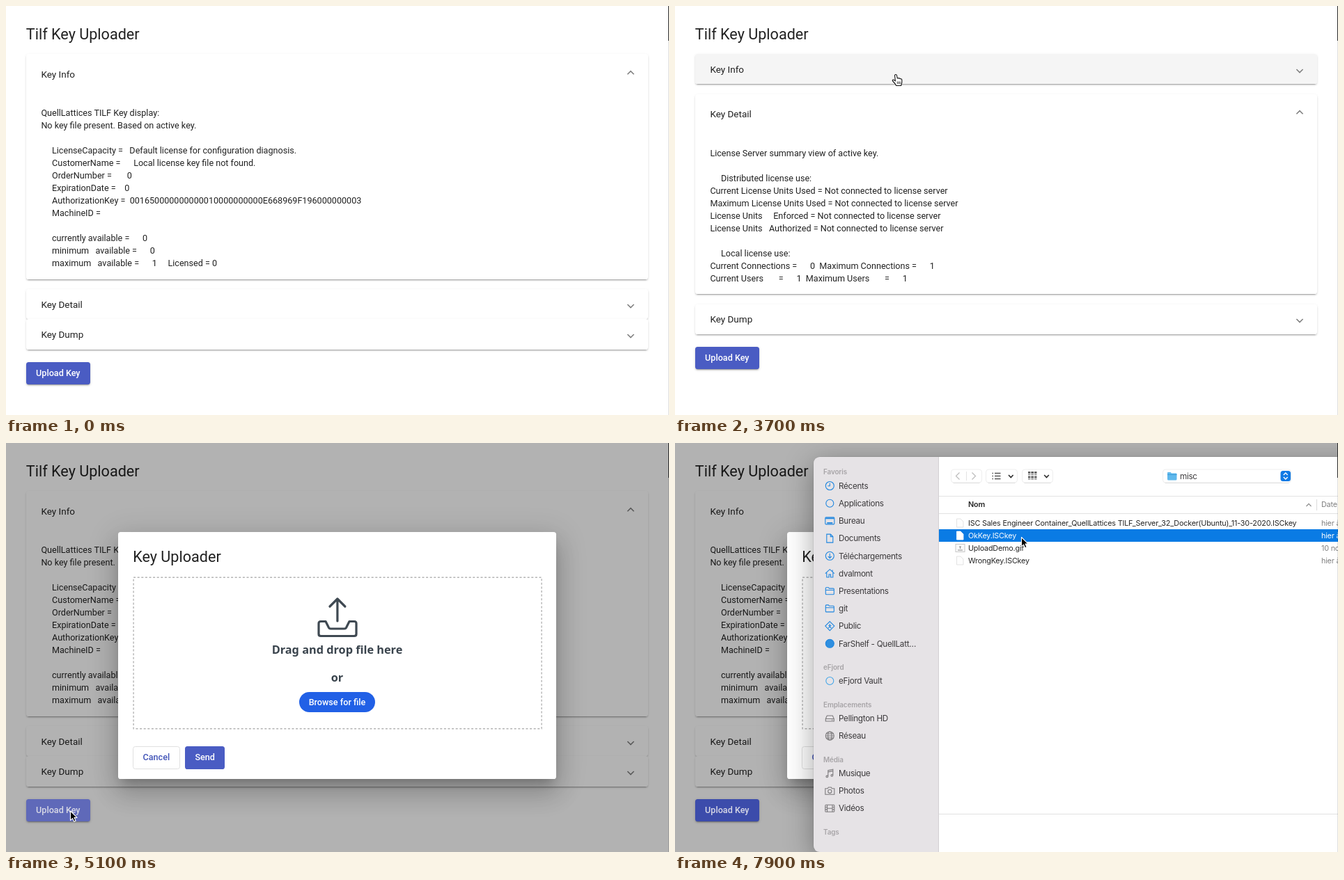
Animation, 952 px wide and 588 px high, one loop 8 s. Source, as an HTML page:

```html
<!DOCTYPE html>
<html lang="en">
<head>
<meta charset="utf-8">
<title>Tilf Key Uploader</title>
<style>
html, body { margin: 0; width: 100%; height: 100%; overflow: hidden; background: #fff; }
#stage { position: relative; width: 952px; height: 588px; overflow: hidden; background: #fff;
  font: 12.6px/18px Roboto, sans-serif; color: rgba(0,0,0,.87); }
#stage * { box-sizing: border-box; }
.abs { position: absolute; }
h1, h2 { position: absolute; margin: 0; font-size: 21.6px; line-height: 32px; font-weight: 400; white-space: nowrap; }
h1 { left: 28.8px; top: 25px; }
#list { left: 28.8px; top: 69px; width: 893.6px; }
.panel { position: relative; background: #fff; border-radius: 3.6px; margin: calc(14.4px * var(--e)) 0;
  box-shadow: 0 2.7px 1px -1.8px rgba(0,0,0,.2), 0 1.8px 1.8px rgba(0,0,0,.14), 0 1px 4.5px rgba(0,0,0,.07); }
.panel:first-child { margin-top: 0; }
.panel:last-child { margin-bottom: 0; }
.head { position: relative; height: calc(43.2px + 14.4px * var(--e)); padding-left: 21.6px;
  display: flex; align-items: center; font-size: 13.5px; border-radius: 3.6px; }
.head svg { position: absolute; left: 862.2px; top: calc(50% - 6px); overflow: visible;
  transform: translateY(calc(2.4px - 4.6px * var(--e))) rotate(calc(180deg * var(--e))); }
.body { overflow: hidden; height: calc(var(--h) * var(--e)); }
pre { margin: 0; padding: 18.4px 0 0 21.6px; font: inherit; }
.btn { position: absolute; height: 32.4px; line-height: 32.4px; text-align: center; font-weight: 500; color: #fff;
  background: #4a5cc3; border-radius: 3.6px;
  box-shadow: 0 2.7px 1px -1.8px rgba(0,0,0,.2), 0 1.8px 1.8px rgba(0,0,0,.14), 0 1px 4.5px rgba(0,0,0,.12); }
#upload { left: 28.8px; width: 92px; z-index: 2; }
#shade { inset: 0; background: #000; z-index: 1; }
#dialog { left: 160.6px; top: 128px; width: 629.8px; height: 355.4px; z-index: 3; background: #fff; border-radius: 3.6px;
  box-shadow: 0 10px 13.5px -6px rgba(0,0,0,.2), 0 21.6px 34px 2.7px rgba(0,0,0,.14), 0 8px 41px 7px rgba(0,0,0,.12); }
#dialog h2 { left: 21.6px; top: 20px; }
.drop { left: 0; width: 100%; text-align: center; font: 700 16.3px/24px "Noto Sans", sans-serif; color: #3a444d; }
#browse { left: 260.2px; top: 230.2px; width: 109.4px; height: 29px; border-radius: 15px; line-height: 29px;
  background: #2160e6; color: #fff; text-align: center; font-weight: 500; }
#finder { left: 199px; top: 20px; width: 1000px; height: 568px; z-index: 4; background: #fff;
  border-radius: 10px 0 0 10px; box-shadow: 0 0 1px rgba(0,0,0,.6), 0 10px 42px rgba(0,0,0,.36); }
#finder svg { position: absolute; left: -199px; top: -20px; }
#finder text { font-family: Inter, sans-serif; }
.side { font-size: 11.7px; letter-spacing: -.025em; fill: #3b393b; }
.group { font-size: 9.9px; font-weight: 600; letter-spacing: -.01em; fill: #a7a4a7; }
.file { font-size: 10.8px; letter-spacing: -.018em; fill: #262626; }
.dim { fill: #808080; }
.picked text { fill: #fff; }
.picked path { fill: #fff; stroke: #fff; }
.cur { left: 0; top: 0; z-index: 6; overflow: visible; }
.edge { left: 951px; width: 1px; z-index: 5; }
</style>
</head>
<body>
<div id="stage">
  <h1>Tilf Key Uploader</h1>
  <div id="list" class="abs"></div>
  <div id="upload" class="btn">Upload Key</div>
  <div id="shade" class="abs"></div>
  <div id="dialog" class="abs">
    <h2>Key Uploader</h2>
    <svg class="abs" style="left:0;top:0" width="630" height="356" fill="none">
      <rect x="22.1" y="65.2" width="586" height="217.6" stroke="#b4b4b4" stroke-width="1.4" stroke-dasharray="3 2.6"/>
      <g stroke="#3f4952" stroke-width="3.2" stroke-linecap="round" stroke-linejoin="round">
        <path d="M314.9 128V96.500M304 107L314.900 96L325.800 107"/>
        <path d="M291 128.500H298L302.500 137.500Q303.300 139 305 139H325Q326.700 139 327.500 137.500L332 128.500H339Q342 128.500 342 131.500V146.500Q342 149.500 339 149.500H291Q288 149.500 288 146.500V131.500Q288 128.500 291 128.500Z"/>
      </g>
    </svg>
    <div class="abs drop" style="top:157px">Drag and drop file here</div>
    <div class="abs drop" style="top:197px">or</div>
    <div id="browse" class="abs">Browse for file</div>
    <div class="btn" style="left:21.6px;top:308.400px;width:67.400px;background:#fff;color:#4254b8;border:1px solid #e0e0e0;line-height:30.400px;box-shadow:none">Cancel</div>
    <div class="btn" style="left:96.400px;top:308.400px;width:57.400px;box-shadow:none">Send</div>
  </div>
  <div id="finder" class="abs"></div>
  <div class="abs edge" style="top:0;height:50px;background:#2c2c2c"></div>
  <div class="abs edge" style="top:50px;height:538px;background:rgba(0,0,0,.12)"></div>
  <svg id="arrow" class="abs cur" width="1" height="1">
    <path d="M0 0V13.400L3.100 10.600L5.200 15.300L7.600 14.200L5.500 9.600H9.600Z" fill="#000" stroke="#fff" stroke-width="1.1" stroke-linejoin="round"/>
  </svg>
  <svg id="hand" class="abs cur" width="1" height="1">
    <path d="M-1.500 .8Q-1.300 -.6 0 -.5Q1.300 -.4 1.500 1L2.300 5Q3.800 3.800 4.700 5.300Q6 4.300 7 5.900Q8.500 5.300 8.800 7.200V10.500L7.600 15.500H.8Q-.8 12.500 -4.300 9Q-5.300 7.600 -4 7Q-2.800 6.600 -.6 8.800Z" fill="#fff" stroke="#111" stroke-width="1.1" stroke-linejoin="round"/>
    <path d="M2.300 9.500V13M4.300 9.500V13M6.200 9.500V13" stroke="#111" stroke-width=".8"/>
  </svg>
</div>
<script>
const $ = id => document.getElementById(id);

const infoText = `QuellLattices TILF Key display:
No key file present. Based on active key.

     LicenseCapacity =   Default license for configuration diagnosis.
     CustomerName =      Local license key file not found.
     OrderNumber =       0
     ExpirationDate =    0
     AuthorizationKey =  001650000000000010000000000E668969F196000000003
     MachineID =

     currently available =      0
     minimum   available =      0
     maximum   available =      1     Licensed = 0`;
const detailText = `License Server summary view of active key.

     Distributed license use:
Current License Units Used = Not connected to license server
Maximum License Units Used = Not connected to license server
License Units     Enforced = Not connected to license server
License Units   Authorized = Not connected to license server

     Local license use:
Current Connections =      0  Maximum Connections =      1
Current Users       =      1  Maximum Users       =      1`;

const panel = (name, text, height) => `<div class="panel" style="--e:0;--h:${height}px">
  <div class="head">${name}<svg width="12" height="12"><path d="M1.400 3.600L6 8.200L10.600 3.600" fill="none" stroke="#808080" stroke-width="1.6"/></svg></div>
  <div class="body"><pre>${text}</pre></div></div>`;
$('list').innerHTML = panel('Key Info', infoText, 266.2) + panel('Key Detail', detailText, 230.2) + panel('Key Dump', '', 0);
const panels = [...document.querySelectorAll('.panel')];
const heads = panels.map(p => p.firstElementChild);

// File chooser
const ring = '<circle r="6"/>';
const folder = '<path d="M-6 4V-4Q-6 -5 -5 -5H-2L-.8 -3.600H5Q6 -3.600 6 -2.600V4Q6 5 5 5H-5Q-6 5 -6 4ZM-6 -1.200H6"/>';
const icons = {
  clock: ring + '<path d="M0 -3.800V.3H-3"/>',
  dot: '<circle r="5.500"/>',
  disc: '<circle r="6" fill="#2f8fe0"/>',
  desk: '<rect x="-6.500" y="-5" width="13" height="10" rx="1.200"/><path d="M-6 -3.600H6M-4 3H4" stroke-width="1.8"/>',
  page: '<path d="M-4.500 -6H1L4.500 -2.500V6H-4.500ZM1 -6V-2.500H4.500"/>',
  down: ring + '<path d="M0 -3.500V3M-2.600 .6L0 3.200L2.600 .6"/>',
  home: '<path d="M-6.500 .2L0 -5.800L6.500 .2M-4.500 -1V5.500H-1.200V1.500H1.200V5.500H4.500V-1M3.800 -2.500V-5"/>',
  folder,
  walk: '<path d="M0 -6.500L6.500 0L0 6.500L-6.500 0ZM0 -3V.5L-2 3M0 .5L2 3M-2 -.6H2.200"/>',
  drive: '<path d="M-6 .5L-4 -4H4L6 .5V4H-6ZM-6 .5H6M2.500 2.300H4.200"/>',
  globe: ring + '<ellipse rx="2.700" ry="6"/><path d="M-6 0H6M-5 -3H5M-5 3H5"/>',
  note: '<path d="M-2.500 4V-4.500L4.500 -6V2.500M-2.500 -2.300L4.500 -3.800"/><circle cx="-4" cy="4.200" r="1.300"/><circle cx="3" cy="2.700" r="1.300"/>',
  photo: '<path d="M-6.500 -3.500H-3L-2 -5.200H2L3 -3.500H6.500V5H-6.500Z"/><circle cy=".6" r="2.600"/>',
  film: '<rect x="-6.500" y="-5" width="13" height="10" rx="1"/><path d="M-3.700 -5V5M3.700 -5V5M-3.700 0H3.700M-6.500 -1.700H-3.700M-6.500 1.700H-3.700M3.700 -1.700H6.500M3.700 1.700H6.500"/>'
};
const words = (x, y, text, cls, extra = '') => `<text x="${x}" y="${y}" class="${cls}" ${extra}>${text}</text>`;
const group = (y, name) => words(213, y + 3.6, name, 'group');
const item = (y, name, icon, color = '#1f86df') =>
  `<g transform="translate(222.300 ${y})" fill="none" stroke="${color}" stroke-width="1.100">${icons[icon]}</g>` +
  words(235, y + 4.2, name, 'side');
const gray = '#7d7b7d';
const line = (d, color = '#555', w = 1.3) => `<path d="${d}" fill="none" stroke="${color}" stroke-width="${w}"/>`;
const pill = (x, w) => `<rect x="${x}" y="38" width="${w}" height="19" rx="4" fill="#fff" stroke="#eee"/>` +
  line(`M${x + 3} 57.500H${x + w - 3}`, '#dedede', 1);

const favs = [['Récents', 'clock'], ['Applications', 'dot'], ['Bureau', 'desk'], ['Documents', 'page'],
  ['Téléchargements', 'down'], ['dvalmont', 'home'], ['Presentations', 'folder'], ['git', 'folder'],
  ['Public', 'walk'], ['FarShelf - QuellLatt…', 'disc']];
const files = [
  ['ISC Sales Engineer Container_QuellLattices TILF_Server_32_Docker(Ubuntu)_11-30-2020.ISCkey', 'hier à 12:04'],
  ['OkKey.ISCkey', 'hier à 12:04'], ['UploadDemo.gif', '10 nov. 2020'], ['WrongKey.ISCkey', 'hier à 12:04']];

const sidebar = group(41, 'Favoris') + favs.map((f, i) => item(61.5 + 25.2 * i, ...f)).join('') +
  group(322, 'eFjord') + item(342, 'eFjord Vault', 'dot', '#42a5e8') +
  group(376, 'Emplacements') + item(396, 'Pellington HD', 'drive', gray) +
  `<g id="net">${item(421, 'Réseau', 'globe', gray)}</g>` +
  `<g id="low">${group(430, 'Média') + item(450, 'Musique', 'note', gray) + item(475, 'Photos', 'photo', gray) +
    item(500, 'Vidéos', 'film', gray) + group(534, 'Tags')}</g>`;

const toolbar = pill(396.5, 44) + line('M418.500 41V54', '#e4e4e4', 1) +
  line('M408.500 42.500L403.500 47.500L408.500 52.500M426.500 42.500L431.500 47.500L426.500 52.500', '#bdbdbd') +
  pill(446.5, 45) + line('M459 43.500H467.500M459 47.500H467.500M459 51.500H467.500') +
  line('M455.500 43.500H457M455.500 47.500H457M455.500 51.500H457', '#555', 1.6) +
  pill(498.5, 44) + line('M507 42.500H519.500M507 49H519.500', '#666', 3.2) + line('M507 45.500H519.500M507 52H519.500', '#666', 1) +
  line('M510.800 40V53M515.600 40V53', '#fff', 1) +
  line('M479 46L482.300 49.500L485.600 46M530.200 46L533.500 49.500L536.800 46', '#333', 1.7) +
  pill(700.5, 184) + '<path d="M707 52V43Q707 42 708 42H711.500L713 43.500H719.500Q720.500 43.500 720.500 44.500V52Q720.500 53.500 719 53.500H708.500Q707 53.500 707 52Z" fill="#5fb8ec"/>' +
  line('M707 45.500H720.500', '#3c9cd8', 1) + words(725, 51.5, 'misc', 'side') +
  '<rect x="869.500" y="40" width="14.500" height="15" rx="3.500" fill="#0f79e4"/>' +
  line('M873.800 46L876.750 43L879.700 46M873.800 49L876.750 52L879.700 49', '#fff', 1.4);

const header = line('M379 76.500H952M379 101.500H952M379 533.500H952', '#e2e2e2', 1) +
  line('M921.500 81V97', '#dcdcdc', 1) + line('M906.500 91L910 87.300L913.500 91', '#888', 1.1) +
  words(421, 92.3, 'Nom', 'file', 'font-weight="600"') + words(928, 92.3, 'Date de modification', 'file dim');

const rows = files.map(([name, date], i) => {
  const y = 115 + 18 * i;
  const icon = i === 2
    ? `<rect x="403" y="${y - 5.5}" width="13" height="11" fill="#fafafa" stroke="#c8c8c8"/>` + line(`M406 ${y + 3}H413M408 ${y - 2}H411M409.500 ${y - 2}V${y + 1}`, '#888', 1)
    : `<path d="M404.500 ${y - 6}H410L414 ${y - 2}V${y + 6}H404.500Z" fill="#fdfdfd" stroke="#dcdcdc" stroke-width=".8"/>`;
  return `<g class="row">${icon}${words(421, y + 3.9, name, 'file')}${words(928, y + 3.9, date, 'file dim')}</g>`;
}).join('');

$('finder').innerHTML = `<svg width="952" height="588">
  <path d="M378.500 20H209Q199 20 199 30V578Q199 588 209 588H378.500Z" fill="#e6e3e6"/>
  ${line('M378.500 20V588', '#d3d0d3', 1)}${sidebar}${toolbar}${header}
  <rect id="pick" x="379" y="124" width="573" height="18" fill="#0a7be4"/>${rows}</svg>`;
const okRow = document.querySelectorAll('.row')[1];

// Timeline in ms
const LOOP = 8000, STEP = 100;
const DETAIL = 2485, INFO = 3755, DIALOG = 4740, CHOOSER = 6400, NETWORK = 6700, PICK = 7400;
const path = [[500, 402, 268], [800, 345, 318], [1200, 262, 388], [1300, 262, 388], [1600, 241, 422], [2600, 241, 422],
  [2700, 241.5, 422], [2900, 268, 292], [3200, 312, 93], [3400, 317, 99], [3800, 317, 99], [4100, 256.5, 179.5],
  [4300, 160, 400], [4500, 100, 515], [4600, 92.5, 529], [5400, 92.5, 529], [5700, 260, 462], [6000, 455, 382],
  [6200, 483, 374.5], [6600, 483, 374.5], [6900, 500, 240], [7300, 497.5, 135.5], [LOOP, 497.5, 135.5]];

const clamp = v => Math.min(1, Math.max(0, v));
const span = (t, start, ms) => clamp((t - start) / ms);

function bezier(x1, y1, x2, y2) {
  const at = (a, b, s) => 3 * a * s * (1 - s) ** 2 + 3 * b * s * s * (1 - s) + s ** 3;
  return x => {
    let lo = 0, hi = 1;
    for (let i = 0; i < 24; i++) {
      const mid = (lo + hi) / 2;
      if (at(x1, x2, mid) < x) lo = mid; else hi = mid;
    }
    return x <= 0 ? 0 : x >= 1 ? 1 : at(y1, y2, lo);
  };
}
const expand = bezier(.4, 0, .2, 1), fade = bezier(.25, .8, .25, 1), pop = bezier(0, 0, .2, 1);

function pointer(t) {
  const i = Math.max(1, path.findIndex(k => k[0] > t));
  const [a, b] = [path[i - 1], path[i]], s = span(t, a[0], b[0] - a[0]);
  return [a[1] + (b[1] - a[1]) * s, a[2] + (b[2] - a[2]) * s];
}
const show = (el, on) => { el.style.display = on ? '' : 'none'; };

function render(t) {
  const d = expand(span(t, DETAIL, 225)) - expand(span(t, INFO, 225));
  [1 - d, d, 0].forEach((e, i) => panels[i].style.setProperty('--e', e));
  const list = $('list'), top = 69 + list.offsetHeight + 18;
  const btn = $('upload'), modal = t >= DIALOG;
  btn.style.top = (list.getBoundingClientRect().bottom + 18) + 'px';
  btn.style.background = !modal ? '' : t < 5500 ? '#5f69b9' : '#3c4cab';
  btn.style.color = modal ? '#d8d9e6' : '';

  const shade = $('shade'), dialog = $('dialog'), p = pop(span(t, DIALOG, 150));
  show(shade, modal);
  shade.style.opacity = .3 * fade(span(t, DIALOG, 360));
  show(dialog, modal);
  dialog.style.opacity = p;
  dialog.style.transform = `scale(${.7 + .3 * p})`;

  show($('finder'), t >= CHOOSER);
  show($('net'), t >= NETWORK);
  $('low').setAttribute('transform', `translate(0 ${t >= NETWORK ? 25.2 : 0})`);
  show($('pick'), t >= PICK);
  okRow.classList.toggle('picked', t >= PICK);

  const [x, y] = pointer(t), visible = t >= 500;
  const over = el => {
    const r = el.getBoundingClientRect();
    return visible && x >= r.left && x < r.right && y >= r.top && y < r.bottom;
  };
  const open = t >= DETAIL && t < INFO ? 1 : 0;
  let link = modal ? t < CHOOSER && over($('browse')) : over(btn);
  heads.forEach((h, i) => {
    const hit = !modal && over(h);
    link = link || hit;
    h.style.background = hit && i !== open ? '#f5f5f5' : '';
  });
  show($('arrow'), visible && !link);
  show($('hand'), visible && link);
  for (const id of ['arrow', 'hand']) $(id).style.transform = `translate(${x}px, ${y}px)`;
}

const begin = performance.now();
function frame() {
  const t = (performance.now() - begin) % LOOP;
  render(Math.floor(t / STEP) * STEP);
  requestAnimationFrame(frame);
}
render(0);
requestAnimationFrame(frame);
</script>
</body>
</html>
```
